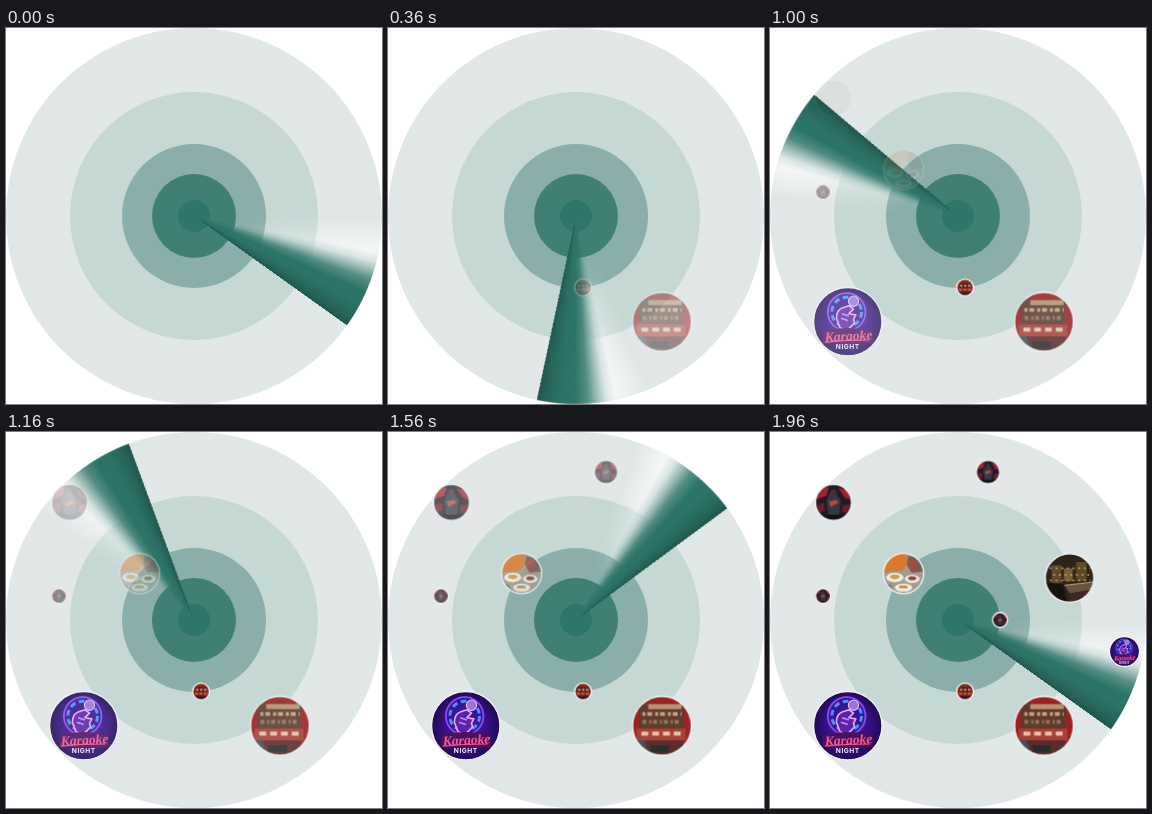
Recreate the animation shown at these times as an HTML page without scripts. Size 376 by 376 pixels, loop 2000 ms.

```html
<!DOCTYPE html>
<html lang="en">
<head>
<meta charset="utf-8">
<title>Nearby radar</title>
<style>
html, body { margin: 0; width: 100%; height: 100%; overflow: hidden; background: #fff; }
.stage { position: relative; width: 100%; height: 100%; overflow: clip; contain: strict; }
svg, .dish, .beam, .beam i { position: absolute; left: 0; top: 0; width: 376px; height: 376px; }
.dish { overflow: clip; contain: strict; }
.beam { border-radius: 50%; overflow: hidden; animation: spin 2s -2ms infinite; }
.glow {
  background: conic-gradient(from 90deg, #d9dfde40 0deg, #ffffff40 5deg, #ffffff90 10deg, #ffffffd8 14deg, #ffffffd8 23deg, #fff0 24deg);
  -webkit-mask: radial-gradient(circle, #0000 50px, #000 175px);
  mask: radial-gradient(circle, #0000 50px, #000 175px);
}
.sweep {
  background: conic-gradient(from 90deg, #2d746800 11deg, #2d746828 14deg, #2d746878 17deg, #2d7468d0 20deg, #2d7468 24deg,
    #2c7267 28deg, #266459 33deg, #1f574d 35.5deg, #1f574d00 35.6deg);
  -webkit-mask: radial-gradient(circle, #0000 3px, #000 10px);
  mask: radial-gradient(circle, #0000 3px, #000 10px);
}
/* one turn takes 1950 ms, then the beam rests until the loop ends */
@keyframes spin {
  0% { transform: rotate(0deg); animation-timing-function: steps(48, end); }
  96% { transform: rotate(354.46deg); animation-timing-function: step-end; }
  98%, to { transform: rotate(360deg); }
}

.spot { opacity: 0; animation: 2s linear -2ms infinite; }
.bar { animation-name: bar; }
.nook { animation-name: nook; }
.sing { animation-name: sing; }
.dot { animation-name: dot; }
.food { animation-name: food; }
.band { animation-name: band; }
.duo { animation-name: duo; }
.hall { animation-name: hall; }
.core { animation-name: core; }
.mini { animation-name: mini; }
@keyframes bar { 0%, 4% { opacity: 0 } 18% { opacity: .5 } 34% { opacity: .76 } 66% { opacity: .92 } 80%, to { opacity: 1 } }
@keyframes nook { 0%, 11% { opacity: 0 } 18% { opacity: .3 } 34% { opacity: .75 } 50%, to { opacity: 1 } }
@keyframes sing { 0%, 25% { opacity: 0 } 34% { opacity: .5 } 50% { opacity: .74 } 66%, to { opacity: 1 } }
@keyframes dot { 0%, 37% { opacity: 0 } 50% { opacity: .4 } 66% { opacity: .6 } 78% { opacity: .74 } 98%, to { opacity: 1 } }
@keyframes food { 0%, 45% { opacity: 0 } 50% { opacity: .15 } 66% { opacity: .68 } 78% { opacity: .84 } 98%, to { opacity: 1 } }
@keyframes band { 0%, 47% { opacity: 0 } 50% { opacity: .04 } 66% { opacity: .45 } 78% { opacity: .7 } 98%, to { opacity: 1 } }
@keyframes duo { 0%, 62% { opacity: 0 } 66% { opacity: .08 } 78% { opacity: .56 } 98%, to { opacity: 1 } }
@keyframes hall { 0%, 79% { opacity: 0 } 98%, to { opacity: 1 } }
@keyframes core { 0%, 82% { opacity: 0 } 98%, to { opacity: 1 } }
@keyframes mini { 0%, 84% { opacity: 0 } 98%, to { opacity: 1 } }

.rim { fill: none; stroke: #f4f4f2; stroke-width: 1.3px; vector-effect: non-scaling-stroke; }
</style>
</head>
<body>
<div class="stage">
<svg viewBox="0 0 376 376">
  <circle cx="188" cy="188" r="188" fill="#e1e8e7"/>
  <circle cx="188" cy="188" r="124" fill="#c5d8d4"/>
  <circle cx="188" cy="188" r="72" fill="#8aafaa"/>
  <circle cx="188" cy="188" r="42" fill="#408074"/>
  <circle cx="188" cy="188" r="16" fill="#2f766a"/>
</svg>

<div class="dish"><div class="beam"><i class="glow"></i><i class="sweep"></i></div></div>

<svg viewBox="0 0 376 376">
  <defs>
    <clipPath id="disc"><circle r="30"/></clipPath>
    <circle id="rim" class="rim" r="30"/>
    <radialGradient id="night">
      <stop offset="0" stop-color="#4a22a8"/>
      <stop offset=".65" stop-color="#331083"/>
      <stop offset="1" stop-color="#220a55"/>
    </radialGradient>

    <g id="counter">
      <g clip-path="url(#disc)">
        <path fill="#9c2023" d="M-30-30h60v60h-60z"/>
        <path fill="#5e3a2e" d="M-23-22h45v26h-45z"/>
        <path fill="#b3946f" d="M-14-22h34v5h-34z"/>
        <path stroke="#c9a477" stroke-width="4" stroke-dasharray="3 2 5 3" d="M-20-12h40"/>
        <path stroke="#96735a" stroke-width="4" stroke-dasharray="4 3 2 2" d="M-20-4h40"/>
        <path fill="#a83f37" d="M-26 3h50v12h-50z"/>
        <path stroke="#e6c5ae" stroke-width="4" stroke-dasharray="7 4" d="M-21 8h42"/>
        <path fill="#5a2b2b" d="M-30 15h52v15h-52z"/>
        <path fill="#3f5257" d="M-30 14l12 1 5 15h-17z"/>
        <path fill="#2b2a2c" d="M-12 20h19v7h-19z"/>
      </g>
      <use href="#rim"/>
    </g>

    <g id="stage">
      <g clip-path="url(#disc)">
        <path fill="#211b29" d="M-30-30h60v60h-60z"/>
        <path fill="#a3202c" d="M-30-18l13-9 9 3-4 13-18 6zM8-24l16 4 4 16-10-5z"/>
        <path fill="#6d1c29" d="M-28 4l12-3 2 12-10 4zM15 5l14-2-6 16-9-3z"/>
        <path fill="#343746" d="M-6-16h10l8 12-3 26h-17l-4-25z"/>
        <circle cy="-17" r="5" fill="#4a302e"/>
        <path fill="#b74a36" d="M-8-1l13-4 3 6-13 6z"/>
        <path fill="#141219" d="M-30 20h60v10h-60z"/>
      </g>
      <use href="#rim"/>
    </g>

    <g id="neon">
      <circle r="30" fill="url(#night)"/>
      <circle cx="-1" cy="-8.5" r="16.5" fill="#351694" stroke="#8a4bf0" stroke-width="1.6"/>
      <circle cx="-1" cy="-8.5" r="13" fill="none" stroke="#4d8dff" stroke-width="2.6" stroke-dasharray="5 3.2"/>
      <path fill="#5526ad" stroke="#f2a4ee" stroke-width="1.5" stroke-linejoin="round"
        d="M-7 5l-3-8q0-7 5-9l6-2 4 3-4 4 6 1-2 4 1 3-5 5-1 3z"/>
      <path stroke="#d985f0" stroke-width="1.5" d="M-5-7l6 2m-7 2l6 2"/>
      <circle cx="5" cy="-18" r="4.5" fill="#9d72dc" stroke="#e4c0ff" stroke-width="1"/>
      <path fill="#4a0f5e" d="M-22 8q22-5 44 0v11h-44z"/>
      <text y="16.5" text-anchor="middle" transform="rotate(-3)" fill="#ff568f"
        font-family="'Liberation Serif', Times, serif" font-style="italic" font-weight="700" font-size="12">Karaoke</text>
      <path fill="none" stroke="#ff568f" stroke-width=".9" d="M-20 18q18-2 39-2"/>
      <text y="24" text-anchor="middle" fill="#f7eaff" font-family="Inter, Arial, sans-serif"
        font-weight="700" font-size="5.8" letter-spacing=".5">NIGHT</text>
      <use href="#rim"/>
    </g>

    <g id="meal">
      <g clip-path="url(#disc)">
        <path fill="#a39a90" d="M-30-30h60v60h-60z"/>
        <path fill="#d9792f" d="M-30-30h34l3 14-9 12-28 2z"/>
        <path fill="#7d5a50" d="M7-26l20 3 3 20-18 2-7-12z"/>
        <path fill="#b9443a" d="M9-18l8-2 2 10-8 2z"/>
        <ellipse cx="-13" cy="6" rx="13" ry="7" fill="#f3eee5"/>
        <ellipse cx="-13" cy="5" rx="7" ry="3.5" fill="#d69a4b"/>
        <ellipse cx="13" cy="8" rx="11" ry="6" fill="#eee9e1"/>
        <ellipse cx="13" cy="7" rx="6" ry="3" fill="#8a4b36"/>
        <ellipse cx="0" cy="21" rx="13" ry="6" fill="#f1ece4"/>
        <path fill="#c48a45" d="M-6 18h11l2 4h-14z"/>
        <path fill="#6b7c84" d="M-30 14l12 3 4 13h-16z"/>
      </g>
      <use href="#rim"/>
    </g>

    <g id="lounge">
      <g clip-path="url(#disc)">
        <path fill="#2d2319" d="M-30-30h60v60h-60z"/>
        <path fill="#5e4a2b" d="M-22-16h12v22h-12zM8-20h13v24h-13z"/>
        <path fill="#76603a" d="M-7-12h11v16h-11z"/>
        <path stroke="#d4a858" stroke-width="2" stroke-dasharray="2 5" d="M-24-12h50M-20-4h44M-24 3h50"/>
        <path fill="#17140f" d="M-30 6l22 2 5 22h-27z"/>
        <path fill="#665447" d="M-6 9l36-3v8l-30 5z"/>
        <path fill="#3a2a22" d="M0 19l30-5v16h-30z"/>
        <path stroke="#b69370" stroke-width="1.5" d="M-6 9l36-4"/>
      </g>
      <use href="#rim"/>
    </g>

    <g id="booth">
      <g clip-path="url(#disc)">
        <path fill="#8c2420" d="M-30-30h60v60h-60z"/>
        <path fill="#33211e" d="M-20-14h40v16h-40zM-30 14h60v16h-60z"/>
        <path stroke="#d79a77" stroke-width="7" stroke-dasharray="9 5" d="M-18-6h38"/>
        <path stroke="#d95040" stroke-width="8" stroke-dasharray="11 5" d="M-22 8h46"/>
      </g>
      <use href="#rim"/>
    </g>
  </defs>

  <g class="spot bar"><use href="#counter" transform="translate(274 293.7) scale(.98)"/></g>
  <g class="spot nook"><use href="#booth" transform="translate(195 259.5) scale(.28)"/></g>
  <g class="spot sing"><use href="#neon" transform="translate(77.8 293.7) scale(1.14)"/></g>
  <g class="spot dot"><use href="#stage" transform="translate(53 164) scale(.25)"/></g>
  <g class="spot food"><use href="#meal" transform="translate(133.5 141.5) scale(.67)"/></g>
  <g class="spot band"><use href="#stage" transform="translate(63.5 70.5) scale(.6)"/></g>
  <g class="spot duo"><use href="#stage" transform="translate(218 40) scale(.39)"/></g>
  <g class="spot hall"><use href="#lounge" transform="translate(299.5 146) scale(.81)"/></g>
  <g class="spot core"><use href="#stage" transform="translate(230 188) scale(.25)"/></g>
  <g class="spot mini"><use href="#neon" transform="translate(354.5 219.5) scale(.5)"/></g>
</svg>
</div>
</body>
</html>
```
